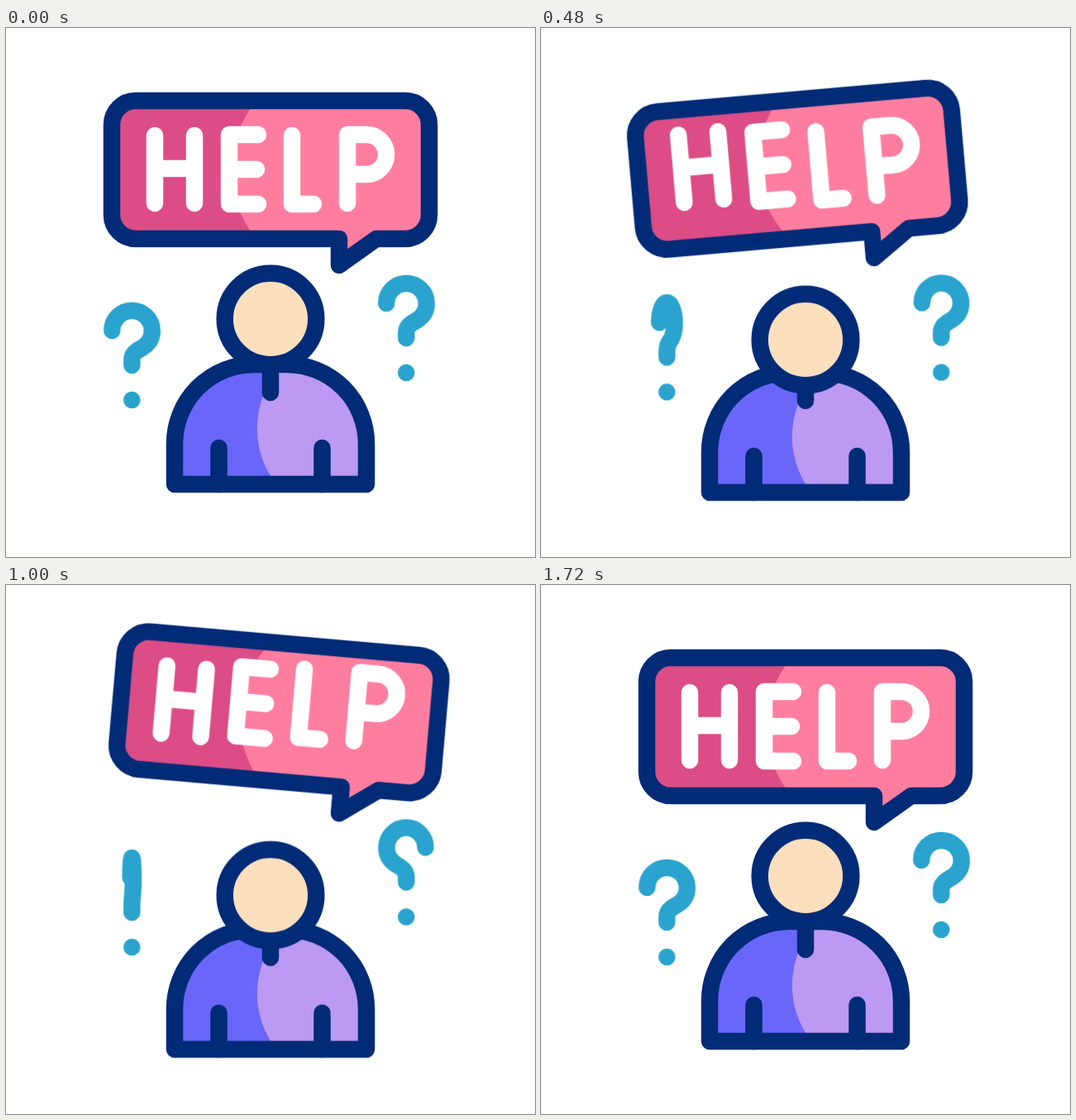
Animation, 640 px wide and 640 px high, one loop 2000 ms. Source, as an HTML page:

```html
<!DOCTYPE html>
<html lang="en">
<head>
<meta charset="utf-8">
<title>Help</title>
<style>
  html, body { margin: 0; width: 100%; height: 100%; overflow: hidden; background: #fff; }
  svg { display: block; width: 640px; height: 640px; }

  .line { fill: none; stroke: #022b77; stroke-width: 20.5; stroke-linecap: round; stroke-linejoin: round; }
  .letters { fill: none; stroke: #fff; stroke-width: 20.5; stroke-linecap: round; stroke-linejoin: round; }
  .hook { fill: none; stroke: #2aa3cf; stroke-width: 20.5; stroke-linecap: round; stroke-linejoin: round; }
  .dot { fill: #2aa3cf; }

  .anim { animation: 2s cubic-bezier(.333, 0, .667, 1) infinite; }
  .bob { animation-name: bob; }
  .tilt { animation-name: tilt; transform-origin: 403px 287px; }
  .hop { animation-name: hop; animation-delay: calc(var(--i) * 133.3ms); }
  .body { animation-name: body; }
  .head { animation-name: head; }
  .lift { animation-name: lift; }
  .hook { animation-name: turn; d: path("M-24 24C-24 10.7 -13.3 0 0 0C13.5 0 24.5 10.7 24.5 24.5C24.5 33.5 20 40 13 44.5C5 49 0 52 0 60L0 66"); }
  .late .anim { animation-delay: 240ms; }

  @keyframes bob {
    0%, 4.25%, 73.65%, 100% { transform: translateY(0); }
    34.5%, 43.25% { transform: translateY(-12.3px); }
  }
  @keyframes tilt {
    0%, 1.7%, 75%, 100% { transform: rotate(0deg); }
    23.4%, 26.25% { transform: rotate(-5deg); }
    48.25%, 53% { transform: rotate(5deg); }
  }
  @keyframes hop {
    0%, 6.67%, 56.67%, 100% { transform: translateY(0); }
    30%, 33.33% { transform: translateY(-14px); }
  }
  @keyframes body {
    0%, 7.3%, 66.25%, 100% { transform: translateY(0); }
    34%, 40.25% { transform: translateY(14.3px); }
  }
  @keyframes head {
    0%, 7.3%, 65.9%, 100% { transform: translateY(0); }
    34%, 39.15% { transform: translateY(36.5px); }
  }
  @keyframes lift {
    0%, 9.5%, 67.8%, 100% { transform: translateY(0); }
    34.5%, 42% { transform: translateY(-15.5px); }
  }
  /* the hook flips to its mirror image and back, stroke width unchanged */
  @keyframes turn {
    0%, 8.75%, 68.75%, 100% {
      d: path("M-24 24C-24 10.7 -13.3 0 0 0C13.5 0 24.5 10.7 24.5 24.5C24.5 33.5 20 40 13 44.5C5 49 0 52 0 60L0 66");
      animation-timing-function: cubic-bezier(.52, 0, .8, .9);
    }
    38.75% {
      d: path("M24 24C24 10.7 13.3 0 0 0C-13.5 0 -24.5 10.7 -24.5 24.5C-24.5 33.5 -20 40 -13 44.5C-5 49 0 52 0 60L0 66");
      animation-timing-function: cubic-bezier(.2, .1, .48, 1);
    }
  }
</style>
</head>
<body>
<svg viewBox="0 0 640 640" role="img" aria-label="HELP">
  <defs>
    <path id="bubble" d="M157 88H483a29 29 0 0 1 29 29V226a29 29 0 0 1-29 29H448L403 287V255H157a29 29 0 0 1-29-29V117a29 29 0 0 1 29-29Z"/>
    <path id="torso" d="M204 552V503a96 96 0 0 1 96-96H340a96 96 0 0 1 96 96V552Z"/>
  </defs>

  <g class="anim bob">
    <g class="anim tilt">
      <use href="#bubble" fill="#dc4c85"/>
      <path fill="#ff7ea0" d="M303 88H483a29 29 0 0 1 29 29V226a29 29 0 0 1-29 29H448L403 287V255H303A130 130 0 0 1 303 88Z"/>
      <use href="#bubble" class="line"/>
      <g class="letters">
        <path class="anim hop" style="--i:0" d="M180 130V212M228 130V212M180 170H228"/>
        <path class="anim hop" style="--i:1" d="M305 129H270V213H305M270 171H303"/>
        <path class="anim hop" style="--i:2" d="M346 130V213H372"/>
        <path class="anim hop" style="--i:3" d="M413 212V129H436a24 24 0 0 1 0 48H413"/>
      </g>
    </g>
  </g>

  <g class="anim body">
    <use href="#torso" fill="#6b66fa"/>
    <path fill="#bc99f2" d="M327 552A109.5 109.5 0 0 1 336 407H340a96 96 0 0 1 96 96V552Z"/>
    <use href="#torso" class="line"/>
    <path class="line" d="M257.5 508V552M382.5 508V552M320 407V441"/>
  </g>
  <g class="anim head">
    <circle class="line" style="fill:#fcdfbd" cx="320" cy="352" r="55.3"/>
  </g>

  <g transform="translate(152.3 342)">
    <g class="anim lift">
      <path class="anim hook"/>
      <circle class="dot" cy="108" r="10.3"/>
    </g>
  </g>
  <g class="late" transform="translate(484.2 309)">
    <g class="anim lift">
      <path class="anim hook"/>
      <circle class="dot" cy="108" r="10.3"/>
    </g>
  </g>
</svg>
</body>
</html>
```
